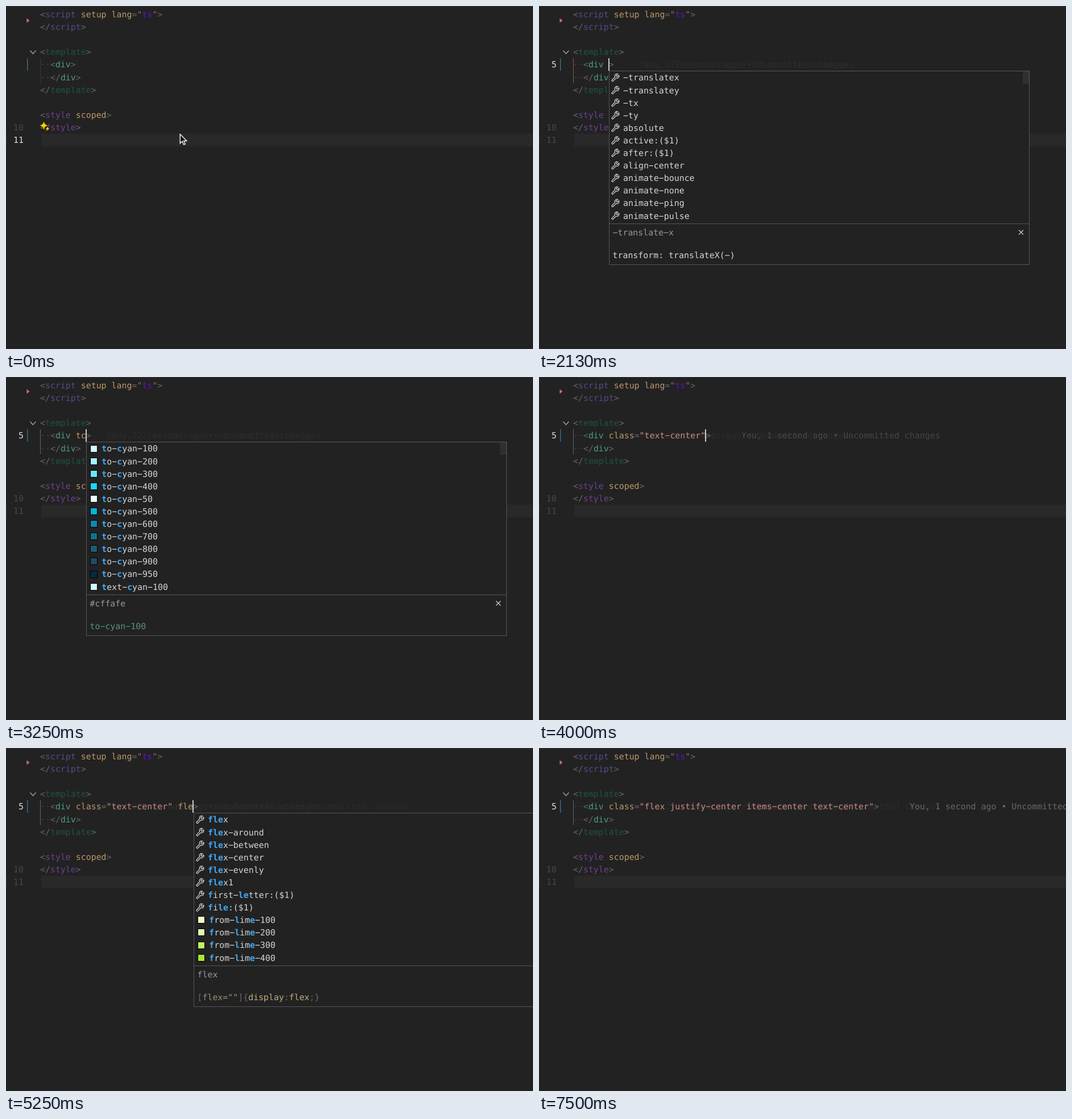
An HTML page with a canvas that plays this animation: 927x604 px, repeating every 8000 ms.

```html
<!DOCTYPE html>
<html lang="en">
<head>
<meta charset="utf-8">
<title>Editor autocomplete</title>
<style>
  html, body { margin: 0; width: 100%; height: 100%; overflow: hidden; background: #222; }
  canvas { display: block; }
</style>
</head>
<body>
<canvas id="stage" width="927" height="604"></canvas>
<script>
const ctx = document.getElementById('stage').getContext('2d');
const LOOP = 8000, STEP = 125;
const LEFT = 60, CHAR = 8.97, ROW = 22.12;
const BG = '#222', GREY = '#666', GOLD = '#bd976a', STRING = '#c98a7d', QUOTE = '#94695f',
  SCRIPT = '#554a88', TEMPLATE = '#1f5343', DIV = '#4d9c80', STYLE = '#6d4190',
  LABEL = '#d6d6d6', MUTED = '#999', MATCH = '#40a8f8', CSS = '#c3ae82';

const colX = col => LEFT + col * CHAR;
const baseline = line => 19.9 + (line - 1) * ROW;

// Draws alternating string / colour arguments; the wide dash matches the editor font.
function text(x, y, ...parts) {
  for (let i = 0; i < parts.length; i += 2) {
    ctx.fillStyle = parts[i + 1];
    ctx.fillText(parts[i].replace(/-/g, '\u2212'), x, y);
    x += parts[i].length * CHAR;
  }
}
function rect(x, y, w, h, color) {
  ctx.fillStyle = color;
  ctx.fillRect(x, y, w, h);
}
function setFont(weight = '') {
  ctx.font = `${weight} 14.9px "DejaVu Sans Mono", monospace`;
}
function drawPath(d, x, y, fill, stroke, width = 1) {
  const path = new Path2D(d);
  ctx.save();
  ctx.translate(x, y);
  if (fill) { ctx.fillStyle = fill; ctx.fill(path); }
  if (stroke) { ctx.strokeStyle = stroke; ctx.lineWidth = width; ctx.stroke(path); }
  ctx.restore();
}

const WRENCH = 'M7.2 7L1.9 12.3a1.3 1.3 0 0 0 1.9 1.9L9.2 8.9A3.8 3.8 0 0 0 14.2 4L11.3 6.7 9.3 4.7 12.1 1.8A3.8 3.8 0 0 0 7.2 7Z';
const ARROW = 'M1 1V17L4.8 13.5 7.4 19.3 10 18.2 7.4 12.6H12.4Z';
const STAR = 'M0-7Q1.2-1.2 7 0 1.2 1.2 0 7-1.2 1.2-7 0-1.2-1.2 0-7Z';
const SMALL_STAR = 'M0-4Q.8-.8 4 0 .8.8 0 4-.8.8-4 0-.8-.8 0-4Z';

const SWATCHES = {
  cyan: { 50: '#ecfeff', 100: '#cffafe', 200: '#a5f3fc', 300: '#67e8f9', 400: '#22d3ee', 500: '#06b6d4',
    600: '#1287b5', 700: '#0e7490', 800: '#1c5e73', 900: '#1b4e60', 950: '#062a45' },
  lime: { 100: '#ecfccb', 200: '#e0f9ad', 300: '#bef264', 400: '#a3e635' }
};
const shades = (prefix, list) => list.split(' ').map(n => `${prefix}-${n}`);

const utility = {
  items: ['-translatex', '-translatey', '-tx', '-ty', 'absolute', 'active:($1)', 'after:($1)', 'align-center',
    'animate-bounce', 'animate-none', 'animate-ping', 'animate-pulse'],
  detail: [['-translate-x', MUTED], ['transform: translateX(-)', LABEL]]
};
const table = {
  items: ['tab', 'table', 'table-auto', 'table-caption', 'table-cell', 'table-column', 'table-fixed', 'table-row',
    'target:($1)', 'text-balance', 'text-center', 'text-left'],
  detail: [['tab', MUTED], ['tab-size: 4;', CSS]]
};
const cyan = {
  items: [...shades('to-cyan', '100 200 300 400 50 500 600 700 800 900 950'), 'text-cyan-100'],
  detail: [['#cffafe', MUTED], ['to-cyan-100', '#56937c']]
};
const flexNames = ['flex', 'flex-around', 'flex-between', 'flex-center', 'flex-evenly', 'flex1'];
const flexDetail = [['flex', MUTED],
  ['[', GREY, 'flex=""', '#9b9076', ']{', GREY, 'display', CSS, ':', GREY, 'flex', CSS, ';}', GREY]];
const flex = {
  items: [...flexNames, 'first-letter:($1)', 'file:($1)', ...shades('from-lime', '100 200 300 400')],
  detail: flexDetail
};
const flexOnly = { items: flexNames, detail: flexDetail };
const rule = (name, prop, value) => [
  ['.', GREY, name, CSS, ' {', GREY],
  ['  ' + prop, CSS, ':', GREY, ' ' + value, CSS, ';', GREY],
  ['}', GREY]
];
const centered = {
  items: ['flex-center'],
  detail: [['flex items-center justify-center', '#aaa'], ...rule('flex', 'display', 'flex'),
    ...rule('items-center', 'align-items', 'center'), ...rule('justify-center', 'justify-content', 'center')]
};

// Each entry: start time, attributes typed after "<div", menu, menu left edge, query.
const CLASS = ' class="text-center"';
const states = [
  [0, ''],
  [1500, ' '],
  [1630, ' ', utility, 123, ''],
  [2250, ' t', table, 132, 't'],
  [2630, ' tc', cyan, 141, 'tc'],
  [3380, CLASS],
  [4630, CLASS + ' ', utility, 302, ''],
  [4880, CLASS + ' f', flex, 311, 'f'],
  [5000, CLASS + ' fl', flex, 320, 'fl'],
  [5130, CLASS + ' fle', flex, 330, 'fle'],
  [5380, CLASS + ' flex', flexOnly, 330, 'flex'],
  [5500, CLASS + ' flex-', { items: flexNames.slice(1, 5), detail: flexDetail }, 343, 'flex-'],
  [5630, CLASS + ' flex-c', centered, 343, 'flex-c'],
  [6250, CLASS + ' flex-center'],
  [6750, ' class="flex justify-center items-center text-center"']
];

// Inline blame: start, end, column, age. Hidden ones leave a faint trace.
const blames = [
  [1000, 1500, 13, '22 seconds'],
  [1500, 1500, 14, '22 seconds'],
  [4000, 4630, 33, '1 second'],
  [7000, LOOP, 66, '1 second']
];

function drawBlame(t) {
  for (const [start, end, col, age] of blames) {
    if (t < start) continue;
    const shown = t < end;
    ctx.globalAlpha = shown ? Math.min(1, (t - start + STEP) / 250) : 1;
    text(colX(col), baseline(5), `You, ${age} ago • Uncommitted changes`, shown ? '#686868' : '#2c2c2c');
    ctx.globalAlpha = 1;
  }
}

function attributes(source) {
  return (source.match(/"|=|[^"=]+/g) || []).reduce((state, part) => {
    const color = part === '"' ? STRING : part === '=' ? GREY : state.quoted ? STRING : GOLD;
    if (part === '"') state.quoted = !state.quoted;
    state.parts.push(part, color);
    return state;
  }, { parts: [], quoted: false }).parts;
}

function drawCode(attrs, editing) {
  const line = (n, ...parts) => text(LEFT, baseline(n), ...parts);
  line(1, '<', GREY, 'script', SCRIPT, ' setup lang', GOLD, '=', GREY, '"', QUOTE, 'ts', '#5d14c6', '"', QUOTE, '>', GREY);
  line(2, '</', GREY, 'script', SCRIPT, '>', GREY);
  line(4, '<', GREY, 'template', TEMPLATE, '>', GREY);
  line(5, '··', '#444', '<', GREY, 'div', DIV, ...attributes(attrs), '>', GREY);
  line(6, '··', '#444', '</', GREY, 'div', DIV, '>', GREY);
  line(7, '</', GREY, 'template', TEMPLATE, '>', GREY);
  line(9, '<', GREY, 'style', STYLE, ' scoped', GOLD, '>', GREY);
  line(10, '</', GREY, 'style', STYLE, '>', GREY);
  text(13, baseline(10), '10', '#484848');
  text(13, baseline(11), '11', editing ? '#484848' : '#ddd');
  if (editing) text(22, baseline(5), '5', '#ddd');
  rect(60, 92, 1, 44, editing ? '#666' : '#3a3a3a');
}

function drawBackdrop() {
  rect(0, 0, 927, 604, BG);
  rect(0, 0, 927, 1, '#303030');
  rect(62, 225, 865, 22, '#292929');
  rect(0, 225, 2, 22, '#292929');
  drawPath('M0 0L5 4 0 8Z', 36.5, 21.5, '#cf6f6f');
  drawPath('M0 0L5 5.5 10 0', 42.5, 78.5, null, '#aaa', 1.2);
  for (let y = 92; y < 114; y += 2) {
    rect(37, y, 1, 1, '#3c82ad');
    rect(38, y + 1, 1, 1, '#3c82ad');
    rect(37, y + 1, 2, 1, '#31617d');
  }
}

// Highlights the query as a greedy subsequence of the label.
function drawLabel(label, query, x, y) {
  let matched = 0;
  [...label].forEach((char, i) => {
    const hit = char === query[matched];
    if (hit) matched++;
    setFont(hit ? 'bold' : '');
    text(x + i * CHAR, y, char, hit ? MATCH : LABEL);
  });
  setFont();
}

function drawMenu({ items, detail }, left, query) {
  const top = 114, right = left + 739;
  const split = Math.round(top + 2.8 + items.length * 22.15);
  const detailY = i => split + 21.3 + (i ? 40 + (i - 1) * ROW : 0);
  const bottom = Math.round(detailY(detail.length - 1) + 11);
  rect(left, top, right - left + 1, bottom - top + 1, '#555');
  rect(left + 1, top + 1, right - left - 1, bottom - top - 1, BG);
  rect(left, split, right - left, 1, '#555');
  if (items.length === 12) rect(right - 11, top + 1, 11, 22, '#303030');

  items.forEach((label, i) => {
    const mid = 126 + i * 22.1;
    const [, hue, shade] = label.match(/(cyan|lime)-(\d+)/) || [];
    if (hue) {
      rect(left + 7, Math.round(mid - 6.5), 13, 13, '#000');
      rect(left + 8, Math.round(mid - 5.5), 11, 11, SWATCHES[hue][shade]);
    } else {
      drawPath(WRENCH, left + 3.5, mid - 8, null, '#ccc', 1.3);
    }
    drawLabel(label, query, left + (hue ? 27.3 : 25), mid + 5.4);
  });
  detail.forEach((parts, i) => text(left + 6.5, detailY(i), ...parts));
  if (items.length > 1 || right < 927) {
    drawPath('M-4-4L4 4M4-4L-4 4', right - 14, split + 15.5, null, '#ccc', 1.2);
  }
}

function drawPointer(t) {
  const u = Math.min(1, t / 880), v = 1 - u;
  const bend = (a, b, c) => a * v * v + 2 * b * u * v + c * u * u;
  drawPath(ARROW, bend(305, 440, 195), bend(225, 145, 94), '#111', '#eee', 1.5);
}

function draw(t) {
  const [, attrs, menu, left, query] = states.findLast(state => state[0] <= t);
  const editing = t >= 880;
  setFont();
  drawBackdrop();
  drawBlame(t);
  drawCode(attrs, editing);
  if (t < 1000) {
    drawPath(STAR, 66.5, 210.5, '#fc0');
    drawPath(SMALL_STAR, 73, 216, '#fc0', BG, .6);
  }
  if (menu) drawMenu(menu, left, query);
  if (editing && t < 6750) rect(Math.round(colX(6 + attrs.length)) - 1, 92, 2, 22, '#ccc');
  if (t < 1500) drawPointer(t);
}

ctx.textRendering = 'geometricPrecision';
const begin = performance.now();
function frame() {
  draw((performance.now() - begin) % LOOP);
  requestAnimationFrame(frame);
}
frame();
</script>
</body>
</html>
```
